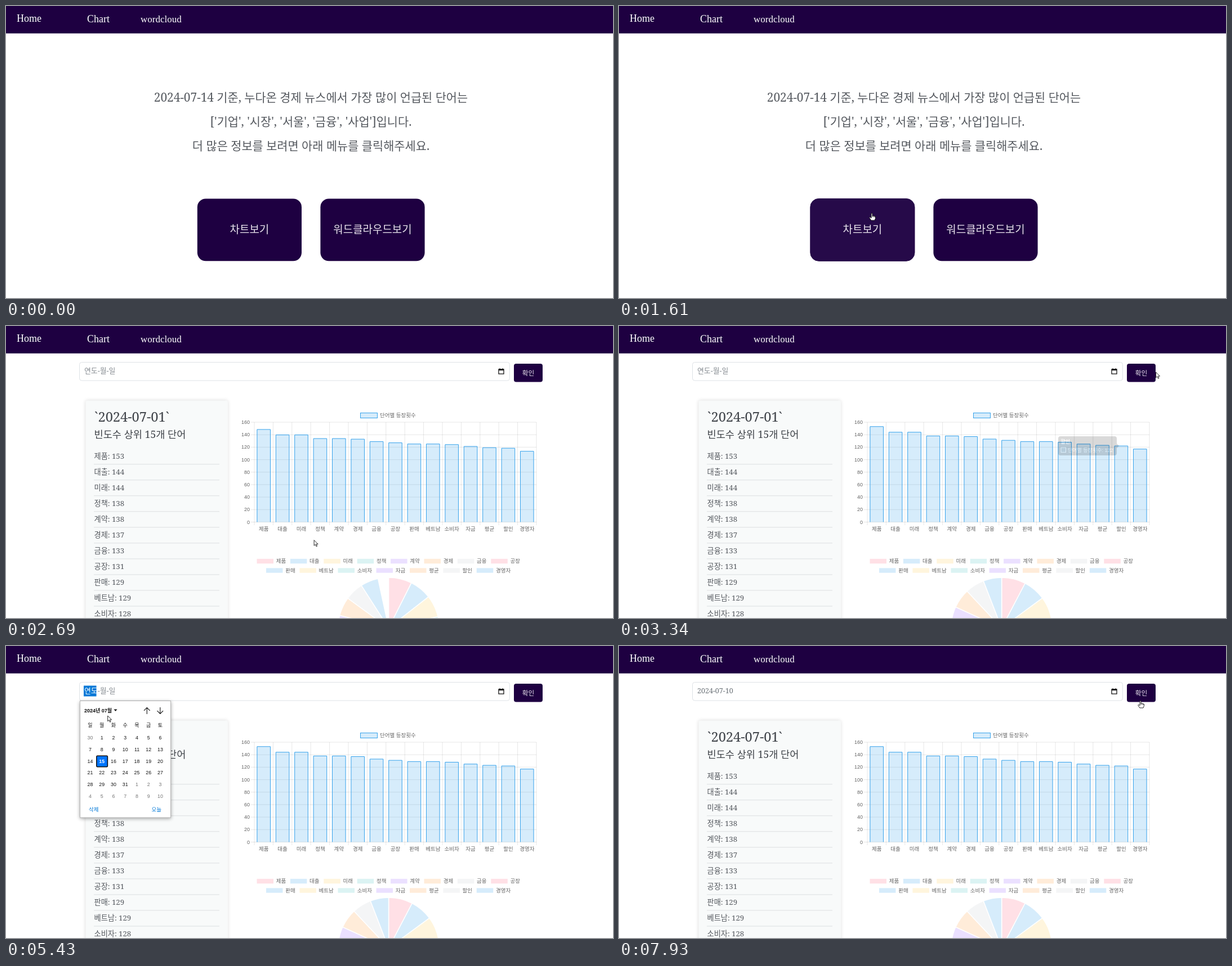
An HTML page that plays this animation: 1078x519 px, repeating every 7990 ms.

```html
<!DOCTYPE html>
<html lang="ko">
<head>
<meta charset="utf-8">
<title>Word frequency</title>
<style>
html, body { margin: 0; width: 100%; height: 100%; overflow: hidden; background: #fff; }
svg { display: block; width: 100%; height: 100%; }
text { white-space: pre; }
.serif { font-family: "Noto Serif Light", "Noto Serif", "Noto Sans CJK KR Light", "Noto Sans CJK KR", "Noto Sans CJK", serif; font-weight: 300; }
.sans { font-family: "Liberation Sans", "Noto Sans CJK KR", "Noto Sans CJK", sans-serif; }
.nav { font-family: "Liberation Serif", serif; }
</style>
</head>
<body>
<svg id="stage" viewBox="0 0 1078 519">
  <defs>
    <filter id="soft" x="-20%" y="-20%" width="140%" height="140%"><feGaussianBlur stdDeviation="3"/></filter>
  </defs>
</svg>
<script>
const LOOP = 7990, NAVY = '#1e0041', HOVER = '#260a49';
const TITLE = '#3d4147', BODY = '#54585e', PALE = '#e8e3ec';
const stage = document.getElementById('stage');

function add(parent, tag, attrs = {}, content) {
  const node = document.createElementNS('http://www.w3.org/2000/svg', tag);
  set(node, attrs);
  if (content !== undefined) node.textContent = content;
  parent.appendChild(node);
  return node;
}
function set(node, attrs) {
  for (const key in attrs) node.setAttribute(key, attrs[key]);
}
const show = (node, on) => node.setAttribute('visibility', on ? 'inherit' : 'hidden');
const group = parent => add(parent, 'g');
const rect = (parent, x, y, width, height, fill, more) =>
  add(parent, 'rect', { x, y, width, height, fill, ...more });
const path = (parent, d, more) => add(parent, 'path', { d, fill: 'none', ...more });
const label = (parent, x, y, size, fill, str, more) =>
  add(parent, 'text', { x, y, 'font-size': size, fill, class: 'serif', ...more }, str);
const MID = { 'text-anchor': 'middle' };
const SANS = { class: 'sans' };
const clamp = v => Math.max(0, Math.min(1, v));
const outQuart = v => 1 - (1 - clamp(v)) ** 4;

// Navigation bar
rect(stage, 0, 0, 1078, 48.7, NAVY);
[['Home', 19, 28, 18], ['Chart', 144, 29, 18], ['wordcloud', 239, 29, 17]]
  .forEach(([str, x, y, size]) => label(stage, x, y, size, '#fff', str, { class: 'nav' }));

// Home page
const home = group(stage);
[
  '2024-07-14 기준, 누다온 경제 뉴스에서 가장 많이 언급된 단어는',
  "['기업', '시장', '서울', '금융', '사업']입니다.",
  '더 많은 정보를 보려면 아래 메뉴를 클릭해주세요.'
].forEach((str, i) => label(home, 541.5, 170 + 43 * i, 20.85, BODY, str, MID));

const [chartButton] = [['차트보기', 339.8], ['워드클라우드보기', 558.4]].map(([str, x]) => {
  const box = rect(home, x, 342.4, 185.2, 110.9, NAVY, { rx: 15 });
  label(home, x + 92.6, 404, 18.95, PALE, str, MID);
  return box;
});

// Chart page
const WORDS = '제품 대출 미래 정책 계약 경제 금융 공장 판매 베트남 소비자 자금 평균 할인 경영자'.split(' ');
const COUNTS = [153, 144, 144, 138, 138, 137, 133, 131, 129, 129, 128, 125, 123, 122, 117];
const TOTAL = COUNTS.reduce((a, b) => a + b);
const HUES = ['255,99,132', '54,162,235', '255,206,86', '75,192,192', '153,102,255', '255,159,64', '201,203,207'];
const BLUE = 'rgb(54,162,235)';
const tint = i => `rgba(${HUES[i === 14 ? 1 : i % 7]},.2)`;
const page = group(stage);

rect(page, 130.5, 64.5, 764, 32.5, '#fff', { rx: 4, stroke: '#dee2e6' });
const yearMark = rect(page, 138, 70.5, 22.5, 19, '#0078d7');
const emptyDate = label(page, 139, 84, 12.9, '#858b91', '');
const emptyYear = add(emptyDate, 'tspan', {}, '연도');
add(emptyDate, 'tspan', {}, '-월-일');
const pickedDate = label(page, 139, 84, 12.5, '#6b7278', '');
const pickedYear = add(pickedDate, 'tspan', {}, '2024');
add(pickedDate, 'tspan', {}, '-07-10');
path(page, 'M875 77h9v8.2h-9zM875 78.3h9M877 75.2v2M882 75.2v2', { stroke: '#111', 'stroke-width': 1.3 });
rect(page, 902, 67, 51, 32.5, NAVY, { rx: 4 });
label(page, 927.5, 87.5, 11.7, PALE, '확인', MID);

// Ranking card
rect(page, 141, 132, 253, 420, '#000', { rx: 4, opacity: .13, filter: 'url(#soft)' });
rect(page, 141.5, 132.5, 252.5, 420, '#f8fafa', { rx: 4 });
label(page, 157, 170, 23.6, TITLE, '`2024-07-01`');
label(page, 156.5, 199, 17.6, TITLE, '빈도수 상위 15개 단어');
WORDS.slice(0, 11).forEach((word, i) => {
  const y = 236 + 28.03 * i;
  label(page, 156.5, y, 13.2, BODY, `${word}: ${COUNTS[i]}`);
  rect(page, 156, y + 9.2, 223, 1, '#dcdfe1');
});

// Bar chart
const LEFT = 441, STEP = 33.4, BASE = 348.5, UNIT = 177.5 / 160;
const GRID = { stroke: '#000', 'stroke-opacity': .11, 'stroke-width': .9 };
for (let v = 0; v <= 160; v += 20) {
  const y = BASE - v * UNIT;
  path(page, `M435 ${y}H942`, GRID);
  label(page, 433, y + 3, 9, '#666', v, { ...SANS, 'text-anchor': 'end' });
}
for (let i = 0; i <= 15; i++) path(page, `M${LEFT + STEP * i} 171V354`, GRID);
rect(page, 629.5, 154.5, 30, 9, tint(1), { stroke: BLUE });
label(page, 664, 161.8, 9.5, '#666', '단어별 등장횟수', SANS);
const bars = WORDS.map((word, i) => {
  const mid = LEFT + STEP * (i + .5);
  label(page, mid, 364, 9.5, '#666', word, { ...SANS, ...MID });
  return path(page, '', { fill: tint(1), stroke: BLUE });
});

// Pie chart
let legendX = 445.5;
WORDS.forEach((word, i) => {
  if (i === 8) legendX = 462;
  const y = i < 8 ? 413.8 : 430.3;
  rect(page, legendX, y, 29.5, 8.4, tint(i));
  label(page, legendX + 34.2, y + 7.2, 9.5, '#666', word, SANS);
  legendX += 42 + 8.7 * word.length;
});
const slices = WORDS.map((_, i) => path(page, '', { fill: tint(i), stroke: '#fff', 'stroke-width': 1.5 }));

// Tooltip
const tip = group(page);
path(tip, 'M784 196h96q4 0 4 4v9l4 4-4 4v9q0 4-4 4h-96q-4 0-4-4v-26q0-4 4-4z', { fill: 'rgba(0,0,0,.8)' });
label(tip, 784.5, 209, 9, '#fff', '할인', { ...SANS, 'font-weight': 700 });
rect(tip, 785, 216, 8.5, 8.5, tint(1), { stroke: '#fff' });
label(tip, 797, 223.5, 9, '#fff', '단어별 등장횟수: 122', SANS);

// Date picker
const picker = group(page);
const COL = 20.75, ROW = 20.8;
rect(picker, 131, 99, 162, 208, '#000', { opacity: .35, filter: 'url(#soft)' });
rect(picker, 131.5, 97.5, 161, 207.5, '#fff', { stroke: '#b5b5b5' });
label(picker, 139, 118, 9, '#111', '2024년 07월', { ...SANS, 'font-weight': 700 });
path(picker, 'M191.5 112.5h6l-3 3.6z', { fill: '#111' });
path(picker, 'M250.3 121V109.5M245 114.8l5.3-5.3 5.3 5.3M273.8 109v11.5M268.5 115.2l5.3 5.3 5.3-5.3', { stroke: '#111', 'stroke-width': 1.1 });
[...'일월화수목금토'].forEach((day, i) =>
  label(picker, 149.5 + COL * i, 144, 9, '#111', day, { ...SANS, ...MID }));
const cells = Array.from({ length: 42 }, (_, i) => {
  const x = 149.5 + COL * (i % 7), y = 163 + ROW * Math.floor(i / 7);
  const outside = i < 1 || i > 31;
  const box = rect(picker, x - 9.4, y - 9.4, 19.5, 19.5, 'none', { rx: 1.5, 'stroke-width': 1.6 });
  const text = label(picker, x, y + 3, 8.8, '#111', i < 1 ? 30 : outside ? i - 31 : i, { ...SANS, ...MID });
  return { box, text, ink: outside ? '#767676' : '#111' };
});
label(picker, 147, 293.5, 9.5, '#0078d7', '삭제', SANS);
label(picker, 258.5, 293.5, 9.5, '#0078d7', '오늘', SANS);

// Pointer
const pointer = group(stage);
const INK = { fill: '#fff', stroke: '#111', 'stroke-width': .9, 'stroke-linejoin': 'round' };
const arrow = path(pointer, 'M.5 .5V10.2L2.8 8.2 4.4 11.8 6 11.1 4.4 7.6H7.5z', INK);
const hand = path(pointer, 'M-1 1Q0-.8 1 1V5.2L2.2 4.7 3.2 5.4 4.4 5.1 5.3 6 6.4 6.2V9.5L5 13H-1.2L-4.2 8.4Q-4.2 6.8-2.5 7.6L-1 9zM1 5.2v2M3.2 5.4v2M5.3 6v1.6', INK);

const TRACK = [
  [200, 1062, 498], [400, 880, 350], [600, 690, 262], [740, 560, 240], [930, 463, 332],
  [1020, 455, 352], [1150, 449, 368], [2140, 449, 368], [2690, 546, 380], [2820, 625, 391],
  [3060, 838, 385], [3200, 890, 240], [3340, 952.8, 81.5], [3480, 984, 88], [3660, 898, 82],
  [3800, 879, 79], [4300, 877, 80], [4470, 822, 86], [4680, 645, 140], [4810, 753, 160],
  [4960, 753, 160], [5430, 181, 123], [5600, 31, 203], [5770, 128, 163], [5890, 191, 161],
  [5980, 191, 161], [6370, 212, 182], [6520, 212, 182], [7310, 865, 125], [7930, 926, 97]
];
function pointerAt(t) {
  const next = TRACK.findIndex(stop => stop[0] > t);
  if (next < 0) return TRACK[TRACK.length - 1].slice(1);
  const [t0, x0, y0] = TRACK[Math.max(0, next - 1)], [t1, x1, y1] = TRACK[next];
  const k = clamp((t - t0) / (t1 - t0 || 1));
  return [x0 + (x1 - x0) * k, y0 + (y1 - y0) * k];
}

function drawCharts(t) {
  const grow = outQuart((t - 2108) / 1000);
  bars.forEach((bar, i) => {
    const x = LEFT + STEP * (i + .5) - 11.8;
    bar.setAttribute('d', `M${x} ${BASE}V${BASE - COUNTS[i] * UNIT * grow}h23.6V${BASE}`);
  });
  const turn = outQuart((t - 2120) / 1000) * 2 * Math.PI / TOTAL;
  const cx = 679.6, cy = 536.8, r = 89.8;
  let sum = 0;
  slices.forEach((slice, i) => {
    const point = n => `${cx + r * Math.sin(n * turn)} ${cy - r * Math.cos(n * turn)}`;
    const from = point(sum), to = point(sum += COUNTS[i]);
    slice.setAttribute('d', turn ? `M${cx} ${cy}L${from}A${r} ${r} 0 0 1 ${to}Z` : '');
  });
}

function drawPicker(t, x, y) {
  const open = t >= 4200 && t < 6570;
  show(picker, open);
  if (!open) return;
  const col = Math.floor((x - 139.2) / COL), row = Math.floor((y - 152.5) / ROW);
  const hover = col >= 0 && col < 7 && row >= 0 && row < 6 ? row * 7 + col : -1;
  const chosen = t < 6370 ? 15 : 10;
  cells.forEach(({ box, text, ink }, i) => {
    const on = i === chosen;
    set(box, { fill: on ? '#0075ff' : i === hover ? '#e5e5e5' : 'none', stroke: on ? '#101010' : 'none' });
    set(text, { fill: on ? '#fff' : ink, 'font-weight': on ? 700 : 400 });
  });
}

function draw(t) {
  const atHome = t < 2080, picked = t >= 6570, focused = t >= 4200 && t < 7870;
  const [x, y] = pointerAt(t);
  show(home, atHome);
  show(page, !atHome);

  const overChart = atHome && t > 930 && y > 342.5;
  const pressed = atHome && t >= 1550;
  set(chartButton, { fill: overChart ? HOVER : NAVY, stroke: pressed ? HOVER : 'none' });

  if (!atHome) {
    drawCharts(t);
    drawPicker(t, x, y);
    show(emptyDate, !picked);
    show(pickedDate, picked);
    show(yearMark, focused);
    yearMark.setAttribute('width', picked ? 29 : 22.5);
    emptyYear.setAttribute('fill', focused ? '#fff' : '#858b91');
    pickedYear.setAttribute('fill', focused ? '#fff' : '#6b7278');
    tip.setAttribute('opacity', .6 * Math.min(clamp((t - 3130) / 90), clamp((3390 - t) / 160)));
  } else {
    [picker, emptyDate, pickedDate, yearMark].forEach(node => show(node, false));
  }

  const overConfirm = !atHome && x > 902 && x < 952.5 && y > 67 && y < 99.5;
  const pointing = overChart || overConfirm;
  show(pointer, t >= 200);
  pointer.setAttribute('transform', `translate(${x} ${y})`);
  arrow.setAttribute('display', pointing ? 'none' : 'inline');
  hand.setAttribute('display', pointing ? 'inline' : 'none');
}

const start = performance.now();
function tick() {
  draw((performance.now() - start) % LOOP);
  requestAnimationFrame(tick);
}
tick();
</script>
</body>
</html>
```
